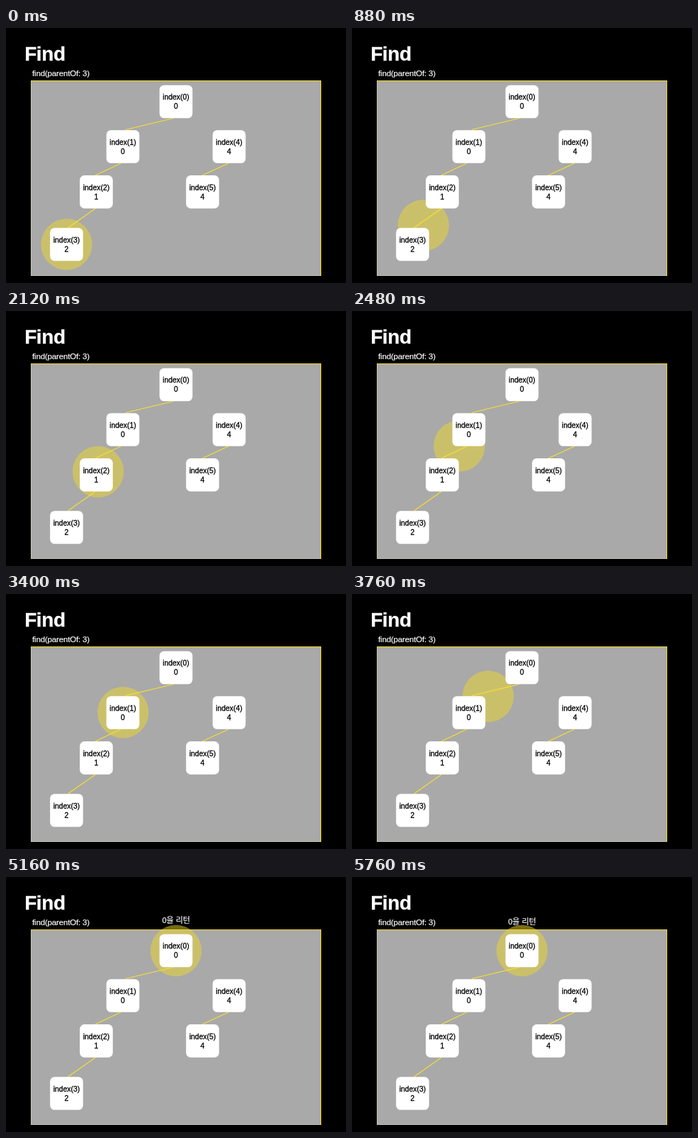
Recreate the animation shown at these times as an HTML page. Size 480 by 360 pixels, loop 6.28 s.

```html
<!DOCTYPE html>
<html lang="ko">
<head>
<meta charset="utf-8">
<title>Find</title>
<style>
  html, body { margin: 0; width: 100%; height: 100%; overflow: hidden; background: #000; }
  svg { display: block; width: 480px; height: 360px; }
  text { font-family: "Liberation Sans", "Noto Sans CJK KR", "Noto Sans CJK", sans-serif; }
  .title { font-size: 28px; font-weight: 700; letter-spacing: -.43px; fill: #fff; stroke: #fff; stroke-width: .3; }
  .call { font-size: 11.5px; letter-spacing: -.16px; fill: #fff; stroke: #fff; stroke-width: .2; }
  .result { font-size: 11px; fill: #fff; stroke: #fff; stroke-width: .2; }
  .node text { font-size: 10.4px; text-anchor: middle; fill: #000; stroke: #000; stroke-width: .3; }
  .node rect { fill: #fff; }
  .edge { stroke: #f8e02e; stroke-width: 1.1; fill: none; }
</style>
</head>
<body>
<svg viewBox="0 0 480 360">
  <rect width="480" height="360" fill="#000"/>
  <rect x="35" y="74" width="410" height="276" fill="#a9a9a9"/>
  <path d="M35.5 74V349.5H445" fill="none" stroke="#c4c2b2"/>
  <path d="M35 74.5H444.5V350" fill="none" stroke="#f0d820"/>
  <text class="title" x="26.2" y="46">Find</text>
  <text class="call" x="37" y="68">find(parentOf: 3)</text>
  <circle id="mark" r="36.2" fill="#edd72d" fill-opacity=".5"/>
  <path class="edge" d="M236 127.5L169 143.5M162 191L126 208M126 255L87.5 282M314 191L277 208"/>
  <g id="nodes"></g>
  <text id="result" class="result" x="220.4" y="67.3">0을 리턴</text>
</svg>
<script>
const LOOP = 6280, STEP = 40, DROP = 67;
const SVG = "http://www.w3.org/2000/svg";
const mark = document.getElementById("mark");
const result = document.getElementById("result");
const nodes = document.getElementById("nodes");

// centre x, centre y, parent value
const tree = [
  [240, 104, 0], [165, 167.5, 0], [127.5, 231.4, 1],
  [85.5, 305.5, 2], [315, 167.5, 4], [277.5, 231.4, 4]
];

// start, duration, from node, to node
const moves = [[480, 960, 3, 2], [1960, 890, 2, 1], [3360, 960, 1, 0]];

function add(parent, tag, attrs, text) {
  const el = document.createElementNS(SVG, tag);
  for (const key in attrs) el.setAttribute(key, attrs[key]);
  if (text !== undefined) el.textContent = text;
  return parent.appendChild(el);
}

tree.forEach(([x, y, value], i) => {
  const g = add(nodes, "g", { class: "node" });
  add(g, "rect", { x: x - 23.3, y: y - 23.3, width: 46.6, height: 46.6, rx: 6.5 });
  add(g, "text", { x, y: y - 2.7 }, `index(${i})`);
  add(g, "text", { x, y: y + 10.2 }, value);
});

const clamp = p => Math.min(1, Math.max(0, p));

// cubic Bezier easing (.4, 0, .6, 1), solved by bisection
function ease(p) {
  let lo = 0, hi = 1, s = .5;
  for (let i = 0; i < 24; i++) {
    s = (lo + hi) / 2;
    const r = 1 - s;
    if (1.2 * r * r * s + 1.8 * r * s * s + s * s * s < p) lo = s; else hi = s;
  }
  return s * s * (3 - 2 * s);
}

function bounce(p) {
  const k = 7.5625, d = 2.75;
  if (p < 1 / d) return k * p * p;
  if (p < 2 / d) return k * (p - 1.5 / d) ** 2 + .75;
  if (p < 2.5 / d) return k * (p - 2.25 / d) ** 2 + .9375;
  return k * (p - 2.625 / d) ** 2 + .984375;
}

function draw(ms) {
  const t = Math.floor((ms % LOOP) / STEP) * STEP;
  let [x, y] = tree[3];
  for (const [start, span, from, to] of moves) {
    if (t <= start) break;
    const [ax, ay] = tree[from], [bx, by] = tree[to];
    const p = t >= start + span ? 1 : ease((t - start) / span);
    x = ax + (bx - ax) * p;
    y = ay + (by - ay) * p;
  }
  mark.setAttribute("cx", x);
  mark.setAttribute("cy", y);

  const q = bounce(clamp((t - 4800) / 950));
  result.setAttribute("visibility", t > 4800 ? "visible" : "hidden");
  result.setAttribute("transform", `translate(0 ${(q - 1) * DROP})`);
}

const begin = performance.now();
function tick() {
  draw(performance.now() - begin);
  requestAnimationFrame(tick);
}
tick();
</script>
</body>
</html>
```
